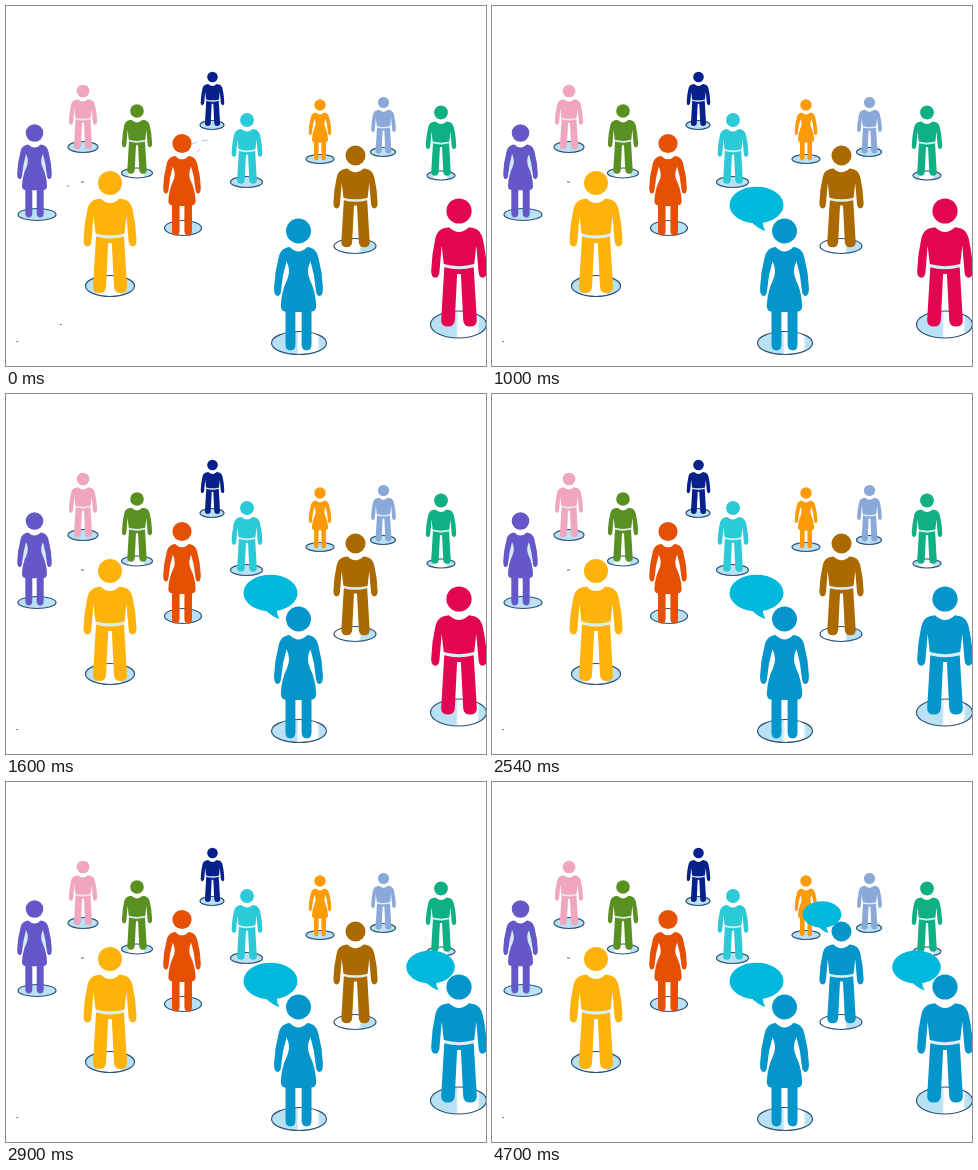
An HTML page for the animation above (5.6 s loop, 480 by 360 pixels).

```html
<!DOCTYPE html>
<html lang="en">
<head>
<meta charset="utf-8">
<title>Spreading the word</title>
<style>
  html, body { margin: 0; width: 100%; height: 100%; overflow: hidden; background: #fff; }
  svg { display: block; width: 100vw; height: 100vh; }
  .base { fill: #b9e0f3; stroke: #2c5478; stroke-width: 1.2; }
  .middle { fill: url(#middle); }
  .left { fill: url(#left); }
  .right { fill: url(#right); }
  .bubble { fill: #00b8dc; visibility: hidden; }
  .bubble, .listener, .start { animation: 5600ms step-end infinite; }
  .first { animation-name: first; }
  .second { animation-name: second; }
  .third { animation-name: third; }
  .red { fill: #e20552; animation-name: red; }
  .brown { fill: #ab6a00; animation-name: brown; }
  .start { animation-name: start; }
  @keyframes first { 17.857% { visibility: visible } 100% { visibility: visible } }
  @keyframes second { 51.785% { visibility: visible } 100% { visibility: visible } }
  @keyframes third { 83.928% { visibility: visible } 100% { visibility: visible } }
  @keyframes red { 35.714% { fill: #0495ca } 100% { fill: #0495ca } }
  @keyframes brown { 67.857% { fill: #0495ca } 100% { fill: #0495ca } }
  @keyframes start { 17.857% { visibility: hidden } 100% { visibility: hidden } }
</style>
</head>
<body>
<svg viewBox="0 0 480 360">
  <defs>
    <!-- White glare on the floor discs -->
    <linearGradient id="middle">
      <stop offset=".2" stop-color="#b9e0f3"/><stop offset=".25" stop-color="#fff"/>
      <stop offset=".7" stop-color="#fff"/><stop offset=".75" stop-color="#b9e0f3"/>
    </linearGradient>
    <linearGradient id="left">
      <stop offset=".6" stop-color="#fff"/><stop offset=".65" stop-color="#b9e0f3"/>
    </linearGradient>
    <linearGradient id="right">
      <stop offset=".45" stop-color="#b9e0f3"/><stop offset=".5" stop-color="#fff"/>
      <stop offset=".83" stop-color="#fff"/><stop offset=".88" stop-color="#b9e0f3"/>
    </linearGradient>

    <!-- Figures have their origin at the centre of the head. -->
    <g id="man">
      <circle r="12"/>
      <path d="M-13.500 52Q0 55.500 13.500 52" fill="none" stroke="#d9edf7" stroke-width="3"/>
      <path d="M-9.500 15.500Q0 24.500 9.500 15.500C17 16.500 20.500 18.500 22.500 26Q26 41 26.500 57Q26.500 63.500 22.500 63.500Q18.800 63.500 18.500 57L16.500 33L14.500 50.500Q0 54.500 -14.500 50.500L-16.500 33L-18.500 57Q-18.800 63.500 -22.500 63.500Q-26.500 63.500 -26.500 57Q-26 41 -22.500 26C-20.500 18.500 -17 16.500 -9.500 15.500Z"/>
      <path d="M-14 53.500Q0 57.500 14 53.500L17 104Q17 110 10.500 110Q4.500 110 4 104L1.800 60H-1.800L-4 104Q-4.500 110 -10.500 110Q-17 110 -17 104Z"/>
    </g>
    <g id="woman">
      <circle r="12"/>
      <path d="M-8.500 15.500Q0 24 8.500 15.500C14 16 17.500 19 19 25Q23 40 23.500 55Q23.500 62.500 20 62.500Q17 62.500 16.500 55Q15.500 42 11.500 29Q7 38 11 47Q16.500 58 17 72Q17 77 12.500 77.500V109Q12.500 115 8 115Q3 115 3 109V78H-3V109Q-3 115 -8 115Q-12.500 115 -12.500 109V77.500Q-17 77 -17 72Q-16.500 58 -11 47Q-7 38 -11.500 29Q-15.500 42 -16.500 55Q-17 62.500 -20 62.500Q-23.500 62.500 -23.500 55Q-23 40 -19 25C-17.500 19 -14 16 -8.500 15.500Z"/>
    </g>
    <g id="speech">
      <ellipse rx="27" ry="18.300"/>
      <path d="M-5 17Q1 23.500 9 26Q6.500 22 6 16Z"/>
    </g>
  </defs>

  <g fill="#46617c">
    <path d="M10.500 335h1.500v1h-1.500zM75 175.500h3v1h-3z"/>
    <path class="start" d="M61.500 179.500h1.500v1h-1.500zM54 318h1.500v1h-1.500z"/>
  </g>
  <path class="start" d="M186 138l5 -2M195 135l7 -1M191 146l3 -3" stroke="#a9c8e6" fill="none"/>

  <ellipse class="base" cx="206" cy="119" rx="12" ry="4.500"/>
  <use href="#man" transform="translate(206.500 71) scale(.445)" fill="#08208a"/>

  <ellipse class="base" cx="77" cy="141" rx="15" ry="5.500"/>
  <use href="#man" transform="translate(77 85) scale(.53)" fill="#efa6be"/>

  <ellipse class="base" cx="377" cy="146" rx="12.500" ry="4.500"/>
  <use href="#man" transform="translate(377.500 96.500) scale(.465)" fill="#8aa8d8"/>

  <ellipse class="base" cx="314" cy="153" rx="14" ry="4.500"/>
  <use href="#woman" transform="translate(314 99) scale(.48)" fill="#fd9a08"/>

  <ellipse class="base middle" cx="131" cy="167" rx="15.500" ry="5"/>
  <use href="#man" transform="translate(131 105) scale(.57)" fill="#5a8f22"/>

  <ellipse class="base middle" cx="435" cy="169.500" rx="14" ry="4.500"/>
  <use href="#man" transform="translate(435 106.500) scale(.575)" fill="#0fb184"/>

  <ellipse class="base" cx="240.500" cy="176" rx="16" ry="5.500"/>
  <use href="#man" transform="translate(241 114) scale(.58)" fill="#2ccad6"/>

  <ellipse class="base" cx="31" cy="208.500" rx="19" ry="6"/>
  <ellipse cx="28.500" cy="160" rx="12" ry="13" fill="#d3eaf7"/>
  <use href="#woman" transform="translate(28.500 127) scale(.735)" fill="#6458c8"/>

  <ellipse class="base middle" cx="177" cy="222" rx="18.500" ry="7.500"/>
  <use href="#woman" transform="translate(176 137.500) scale(.8)" fill="#e55004"/>

  <use href="#speech" class="bubble third" transform="translate(330 132.500) scale(.72)"/>
  <ellipse class="base left" cx="349" cy="240" rx="21" ry="7.500"/>
  <use href="#man" class="listener brown" transform="translate(349.500 149.500) scale(.835)"/>

  <ellipse class="base middle" cx="104" cy="280" rx="24.500" ry="10.500"/>
  <use href="#man" transform="translate(104 177)" fill="#feb30c"/>

  <use href="#speech" class="bubble second" transform="translate(424.500 185) scale(.9)"/>
  <ellipse class="base right" cx="452.500" cy="318.500" rx="28" ry="13.500"/>
  <use href="#man" class="listener red" transform="translate(453 205) scale(1.05)"/>

  <use href="#speech" class="bubble first" transform="translate(264.500 199)"/>
  <ellipse class="base right" cx="293" cy="337" rx="27.500" ry="11.500"/>
  <use href="#woman" transform="translate(292.500 225) scale(1.04)" fill="#0495ca"/>
</svg>
</body>
</html>
```
